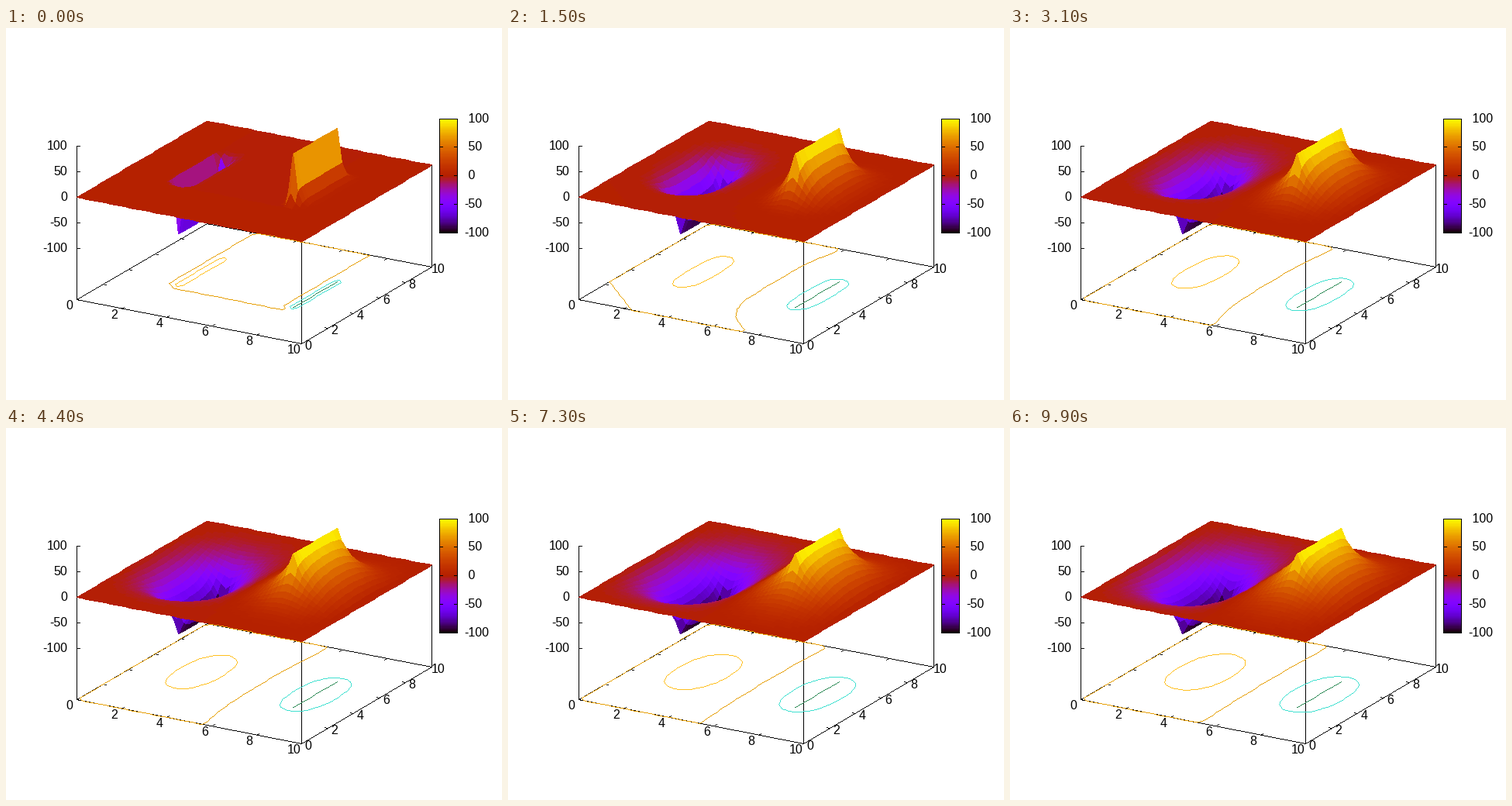
Recreate the animation shown at these times as a matplotlib script. Size 640 px wide and 480 px high, loop 10000 ms.

```python
import numpy as np
import matplotlib.pyplot as plt
from matplotlib.animation import FuncAnimation
from matplotlib.collections import PolyCollection
from matplotlib.colors import to_rgba

W, H, DPI = 640, 480, 100
N, FRAMES = 48, 100
PLATES = {N // 4: -100.0, 3 * N // 4: 100.0}
ROWS = range(N // 3, 2 * N // 3 + 1)
FLOOR = -200
LEVELS = [-50, -1e-60, 50, 100 - 1e-6]
LEVEL_COLORS = ["#ffc020", "#e69f00", "#40e0d0", "#2e8b57"]


def project(x, y, z):
    """Map box coordinates to whole stage pixels."""
    px = 320 + np.trunc(29.1 * x + 16.8 * y - 229.5)
    py = np.round(218.2 + 5.7 * x - 9.87 * y - 0.66 * z)
    return np.stack([px, py], axis=-1)


def palette(v):
    """Colour of a height in -100..100, in 128 steps."""
    g = np.clip(np.floor((v + 100) / 200 * 128), 0, 127) / 127
    blue = np.clip(np.sin(2 * np.pi * g), 0, 1)
    return np.stack([np.sqrt(g), g ** 3, blue], axis=-1)


def relax(frames):
    """One Gauss-Seidel sweep of the Laplace equation per frame, u[x][y]."""
    u = [[0.0] * N for _ in range(N)]
    for i, v in PLATES.items():
        for j in ROWS:
            u[i][j] = v
    states = []
    for _ in range(frames):
        for i in range(1, N - 1):
            left, row, right = u[i - 1], u[i], u[i + 1]
            for j in range(1, N - 1):
                if not (i in PLATES and j in ROWS):
                    row[j] = (left[j] + right[j] + row[j - 1] + row[j + 1]) / 4
        states.append(np.array(u))
    return states


def stroke(layer, pts, color="black"):
    """Draw a hard one-pixel polyline."""
    rgba = to_rgba(color)
    for a, b in zip(pts[:-1], pts[1:]):
        a, b = np.asarray(a), np.asarray(b)
        n = int(np.abs(b - a).max())
        t = np.linspace(0, 1, n + 1)[:, None]
        x, y = np.floor(a + (b - a) * t + 0.5).astype(int).T
        layer[y, x] = rgba


states = relax(FRAMES)
axis = np.linspace(0, 10, N)
gx, gy = np.meshgrid(axis, axis, indexing="ij")

fig = plt.figure(figsize=(W / DPI, H / DPI), dpi=DPI, facecolor="white")
ax = fig.add_axes([0, 0, 1, 1])
ax.axis("off")


def show(layer, zorder):
    return ax.imshow(layer, extent=(0, W, H, 0), aspect="auto",
                     interpolation="nearest", zorder=zorder)


def label(x, y, s, ha):
    ax.text(x, y + 5, s, ha=ha, va="baseline", fontsize=16 * 72 / DPI,
            family="Liberation Sans", color="black", zorder=6)


box = np.zeros((H, W, 4))
stroke(box, [project(x, y, FLOOR) for x, y in [(0, 0), (10, 0), (10, 10), (0, 10), (0, 0)]])
stroke(box, [project(0, 0, FLOOR), project(0, 0, 100)])
for x in (0, 10):
    stroke(box, [project(10, x, FLOOR), project(10, x, 0)])

# Ticks with their mirrors on the far edges
for v in range(0, 11, 2):
    for edge, d in [(0, 1), (10, -1)]:
        p = project(v, edge, FLOOR)
        stroke(box, [p, p + [3 * d, -2 * d]])
        p = project(edge, v, FLOOR)
        stroke(box, [p, p + [4 * d, d]])
    x, y = project(v, 0, FLOOR)
    label(x - 9, y + 8, str(v), "center")
    x, y = project(10, v, FLOOR)
    label(x + 4.5 if v < 10 else x - 0.5, y + 3, str(v), "left")

for v in range(-100, 101, 50):
    p = project(0, 0, v)
    stroke(box, [p, p + [4, 0]])
    label(79.5, p[1], str(v), "right")

# Colour bar
X0, X1, Y0, Y1 = 559, 582, 117, 264
bar = palette(np.linspace(100, -100, Y1 - Y0 + 1))
box[Y0:Y1 + 1, X0:X1 + 1, :3] = bar[:, None, :]
box[Y0:Y1 + 1, X0:X1 + 1, 3] = 1
stroke(box, [(X0, Y0), (X1, Y0), (X1, Y1), (X0, Y1), (X0, Y0)])
for v in range(-100, 101, 50):
    y = int((Y0 + Y1) / 2 - v * (Y1 - Y0) / 200)
    stroke(box, [(X0, y), (X0 + 4, y)])
    stroke(box, [(X1, y), (X1 - 4, y)])
    label(591.5, y, f"{v: d}", "left")

show(box, 2)
surface = PolyCollection([], lw=0, edgecolor="none", antialiased=False, snap=False, zorder=3)
ax.add_collection(surface, autolim=False)
rings = show(np.zeros((H, W, 4)), 4)
ax.set_xlim(0, W)
ax.set_ylim(H, 0)


def corners(a):
    """Cell corners, ordered from the back of the box to the front."""
    quads = np.stack([a[:-1, :-1], a[1:, :-1], a[1:, 1:], a[:-1, 1:]], axis=2)
    return quads[:, ::-1].swapaxes(0, 1).reshape((-1,) + quads.shape[2:])


def update(k):
    u = states[k]
    surface.set_verts(corners(project(gx, gy, u) + 0.5))
    surface.set_facecolor(palette(corners(u).mean(axis=1)))

    layer = np.zeros((H, W, 4))
    cs = ax.contour(gx, gy, u, levels=LEVELS)
    for group, color in zip(cs.allsegs, LEVEL_COLORS):
        for seg in group:
            stroke(layer, project(seg[:, 0], seg[:, 1], FLOOR), color)
    cs.remove()
    rings.set_data(layer)
    return surface, rings


anim = FuncAnimation(fig, update, frames=FRAMES, interval=100, repeat=True, repeat_delay=0)
plt.show()
```
